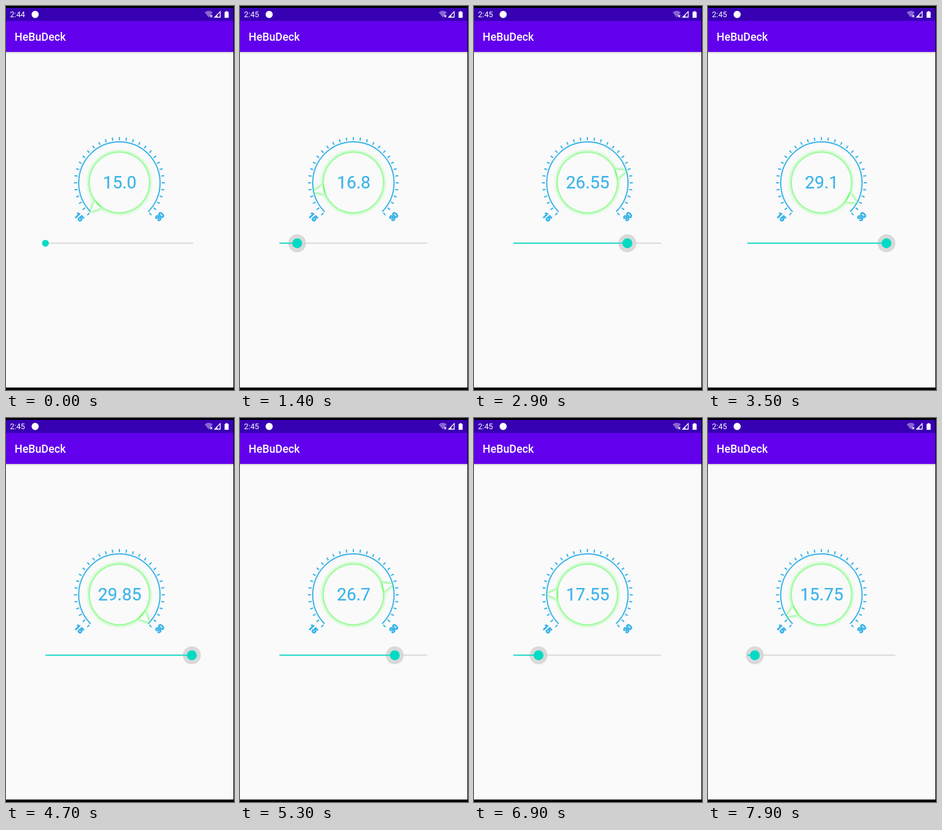
These frames come from a looping animation (370x619 px, 8000 ms). An HTML page:

```html
<!DOCTYPE html>
<html lang="en">
<head>
<meta charset="utf-8">
<title>Dial</title>
<style>
html, body { margin: 0; width: 100%; height: 100%; overflow: hidden; background: #000; }
svg { display: block; width: 370px; height: 619px; font-family: Roboto, sans-serif; }
.blue { fill: none; stroke: #3db4e9; stroke-width: 2; }
.label { font-size: 12.4px; text-anchor: middle; stroke-width: 1.9; }
#value { font-size: 28px; text-anchor: middle; fill: #3db4e9; stroke: #3db4e9; stroke-width: .25; }
</style>
</head>
<body>
<svg viewBox="0 0 370 619">
  <defs>
    <filter id="glow" x="-50%" y="-50%" width="200%" height="200%" color-interpolation-filters="sRGB">
      <feDropShadow dx="0" dy="0" stdDeviation="3" flood-color="#0f0"/>
    </filter>
    <filter id="softGlow" filterUnits="userSpaceOnUse" x="160" y="205" width="48" height="46" color-interpolation-filters="sRGB">
      <feDropShadow dx="0" dy="0" stdDeviation="2.4" flood-color="#0f0"/>
    </filter>
    <linearGradient id="shade" x2="0" y2="1">
      <stop stop-color="#000" stop-opacity=".2"/>
      <stop offset="1" stop-color="#000" stop-opacity="0"/>
    </linearGradient>
  </defs>

  <rect y="3" width="369" height="612" fill="#fafafa"/>
  <rect y="3" width="369" height="21" fill="#3700b3"/>
  <rect y="24" width="369" height="50" fill="#6200ee"/>
  <rect y="74" width="369" height="3" fill="url(#shade)"/>

  <g fill="#fff">
    <text id="clock" x="6.5" y="18" font-size="12.6">2:44</text>
    <circle cx="47.3" cy="13.6" r="5.8"/>
    <path d="M322.5 10.2Q329 5.500 335.500 10.200L329 18.500Z" opacity=".4"/>
    <path d="M331.300 14.500l3.400 3.600m0-3.600l-3.400 3.600" stroke="#fff" stroke-width="1.100"/>
    <path d="M338.700 18L347.600 18V9.100Z" fill="none" stroke="#fff" stroke-width="1.300"/>
    <path d="M338.700 18H343V13.700Z"/>
    <path d="M354.700 9.500h1.900v-1.300h2.800v1.300h1.900v9.500h-6.600z"/>
    <text x="14" y="56.200" font-size="17.800" font-weight="500">HeBuDeck</text>
  </g>

  <path class="blue" d="M137.300 331.700A66 66 0 1 1 230.700 331.700"/>
  <g id="ticks" class="blue"></g>
  <text class="blue label" transform="translate(118.500 340) rotate(45)" y="4.400">15</text>
  <text class="blue label" transform="translate(249.500 339.500) rotate(-45)" y="4.400">30</text>

  <circle cx="184" cy="284.500" r="48" fill="#fafafa" filter="url(#glow)"/>
  <g id="pointer"><path d="M184 219L191.500 235H176.500Z" fill="#fafafa" filter="url(#softGlow)"/></g>
  <text id="value" x="184.500" y="294">15.0</text>

  <circle id="halo" cy="382.400" r="14.500" fill="#000" fill-opacity=".13"/>
  <path d="M64 382.400H304" stroke="#d6d6d6" stroke-width="1.800"/>
  <path id="fill" stroke="#03dac5" stroke-width="1.800"/>
  <circle id="thumb" cy="382.400" fill="#03dac5"/>
</svg>
<script>
const LOOP = 8000, STEP = 100;

// Slider percentages, one per step, from each start time on; the last one holds.
const drags = [
  [0, [0]],
  [1000, [0, 2, 6, 8, 12, 14, 18, 20, 24,
          27, 31, 36, 42, 48, 53, 59, 65, 70,
          73, 77, 80, 83, 87, 90, 92, 94, 95,
          96, 98, 99, 100]],
  [4700, [99, 96, 93, 90, 87, 82, 78, 77, 75,
          73, 70, 67, 63, 58, 53, 48, 44, 40,
          36, 31, 27, 22, 17, 12, 8, 5, 3]],
  [7900, [5]]
];

const $ = id => document.getElementById(id);
const set = (id, attrs) => {
  for (const key in attrs) $(id).setAttribute(key, attrs[key]);
};

let ticks = "";
for (let a = -135; a <= 135; a += 9)
  ticks += `<path d="M184 211.300V216.300" transform="rotate(${a} 184 285)"/>`;
$("ticks").innerHTML = ticks;

function percentAt(t) {
  const [start, list] = drags.filter(d => d[0] <= t).pop();
  return list[Math.min(list.length - 1, Math.floor((t - start) / STEP))];
}

// Single-precision sum, printed with the fewest digits that identify it.
function reading(p) {
  const f = Math.fround, v = f(f(f(0.15) * p) + 15);
  let digits = 2, n;
  do n = +v.toPrecision(digits++); while (f(n) !== v);
  return Number.isInteger(n) ? n + ".0" : String(n);
}

function draw(t) {
  const p = percentAt(t), x = 64 + 2.4 * p, pressed = t >= 1000;
  set("pointer", { transform: `rotate(${-135 + 2.7 * p} 184 285)` });
  set("halo", { cx: x, visibility: pressed ? "visible" : "hidden" });
  set("fill", { d: `M64 382.400H${x}` });
  set("thumb", { cx: x, r: pressed ? 8 : 5.5 });
  $("value").textContent = reading(p);
  $("clock").textContent = pressed ? "2:45" : "2:44";
}

const begin = performance.now();
function tick() {
  draw((performance.now() - begin) % LOOP);
  requestAnimationFrame(tick);
}
tick();
</script>
</body>
</html>
```
